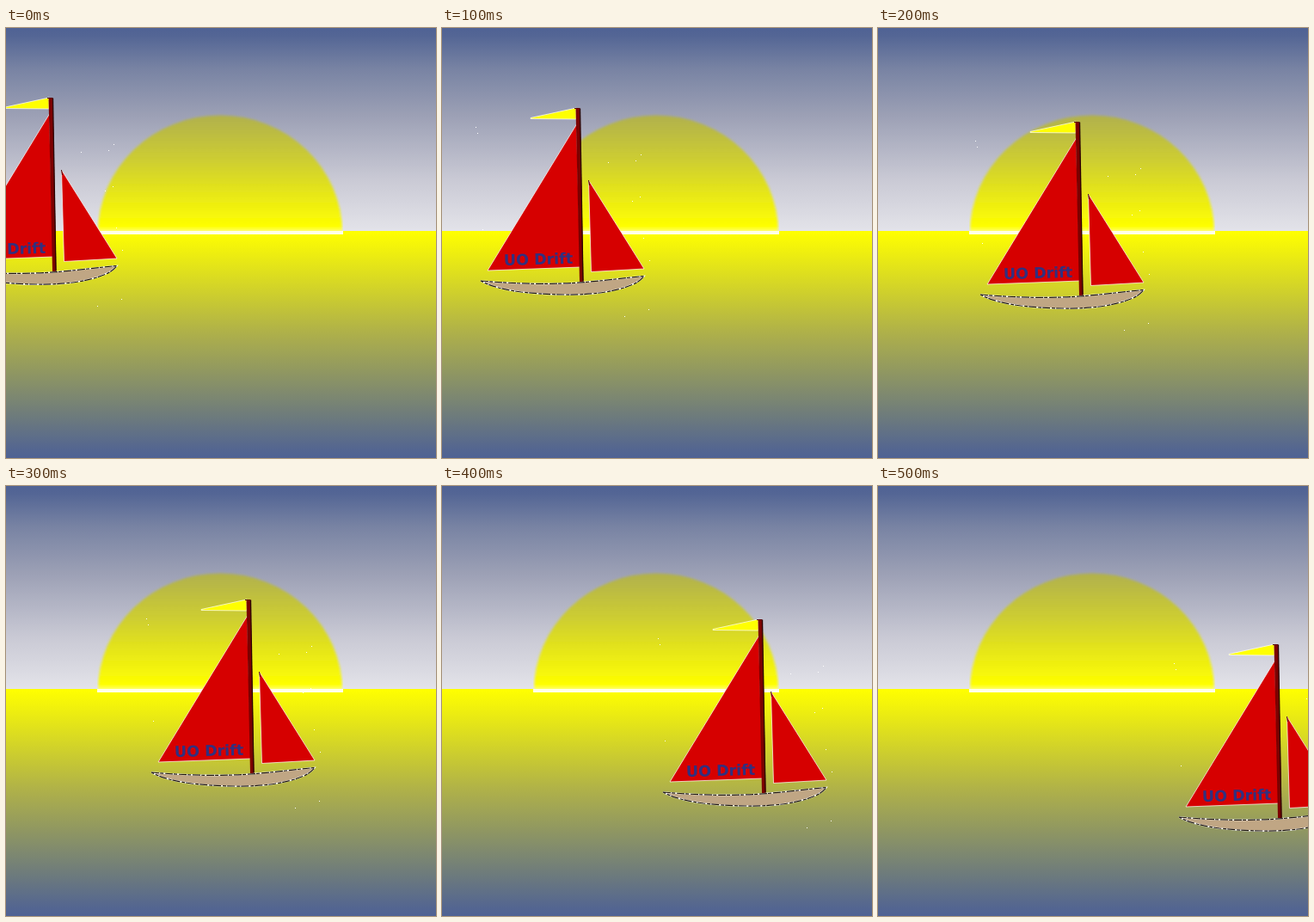
Write an HTML page that moves like this. It is 500 px wide and 500 px high and loops after 600 ms.

```html
<!DOCTYPE html>
<html lang="en">
<head>
<meta charset="utf-8">
<title>Sailing at sunset</title>
<style>
  html, body { margin: 0; width: 100%; height: 100%; overflow: hidden; }
  svg { display: block; width: 100%; height: 100%; }
  text { font: bold 17.5px "DejaVu Sans", Verdana, sans-serif; fill: #303080; }
</style>
</head>
<body>
<svg viewBox="0 0 500 500">
  <defs>
    <linearGradient id="sky" x2="0" y2="1">
      <stop offset="0" stop-color="#4f6294"/>
      <stop offset=".04" stop-color="#546695"/>
      <stop offset=".2" stop-color="#7883a3"/>
      <stop offset=".43" stop-color="#9ca0b5"/>
      <stop offset=".75" stop-color="#cacad5"/>
      <stop offset="1" stop-color="#e3e3e9"/>
    </linearGradient>
    <linearGradient id="sea" x2="0" y2="1">
      <stop offset="0" stop-color="#ff0"/>
      <stop offset=".06" stop-color="#f5f509"/>
      <stop offset=".45" stop-color="#aeb04a"/>
      <stop offset=".96" stop-color="#546690"/>
      <stop offset="1" stop-color="#4f6294"/>
    </linearGradient>
    <linearGradient id="sun" gradientUnits="userSpaceOnUse" x1="0" x2="0" y1="101" y2="240">
      <stop offset="0" stop-color="#b0b04c"/>
      <stop offset=".4" stop-color="#cfcf30"/>
      <stop offset=".8" stop-color="#f3f30b"/>
      <stop offset=".94" stop-color="#ff0"/>
      <stop offset="1" stop-color="#ffffc0"/>
    </linearGradient>
    <filter id="soft"><feGaussianBlur stdDeviation="1.8"/></filter>
    <clipPath id="above"><path d="M106 0H392V240H106z"/></clipPath>
    <path id="hull" d="M45 294C80 297 110 298 140 297C175 296 205 291 235 288.500C228 298 212 303 190 307C160 312 120 310 92 307C70 304 56 300 45 294z"/>
  </defs>

  <path fill="url(#sky)" d="M0 0H500V236H0z"/>
  <path fill="url(#sea)" d="M0 236H500V500H0z"/>
  <g clip-path="url(#above)">
    <ellipse cx="249" cy="238" rx="142" ry="136.500" fill="url(#sun)" filter="url(#soft)"/>
  </g>
  <path fill="#ffffe8" d="M106 236H392V240H106z"/>

  <g id="boat">
    <g stroke="#fff" stroke-width=".7">
      <path fill="#ff0" d="M103 104.500L156 93V106L103 105.500z"/>
      <path fill="#d60000" d="M156.500 112L53 282L161 278z"/>
      <path fill="#d60000" d="M170.500 177L173.500 283.500L235 280z"/>
    </g>
    <path fill="none" stroke="#400" d="M154 93.500H160M170.500 177L171.500 183"/>
    <path fill="#7c0000" d="M155.500 93.500H160.500L164.500 295H160z"/>
    <path fill="none" stroke="#2a0000" stroke-width="1.3" d="M160.500 93.500L164 295"/>
    <use href="#hull" fill="#c0a684" stroke="#fff" stroke-width="1.6"/>
    <use href="#hull" fill="none" stroke="#221a14" stroke-width="1.2" stroke-dasharray="9 1 4 2"/>
    <text transform="translate(72 276) rotate(-1.500)">UO Drift</text>
    <path stroke="#fff" stroke-width="1.2"
      d="M39 115.500h1M41 122.500h1M193 156.500h1M231 147.500h1M225 154.500h1M230 196.500h1M221 201.500h1M47 234.500h1M234 244.500h1M241 270.500h1M240 327.500h1M212 335.500h1"/>
  </g>
</svg>
<script>
  const boat = document.getElementById("boat");
  const stops = [[-106, -12], [0, 0], [74, 16], [124, 39], [212, 62], [305, 91]];
  const STEP = 100;

  function draw(now) {
    const [x, y] = stops[Math.floor(now / STEP) % stops.length];
    boat.setAttribute("transform", `translate(${x} ${y})`);
    requestAnimationFrame(draw);
  }
  draw(performance.now());
</script>
</body>
</html>
```
